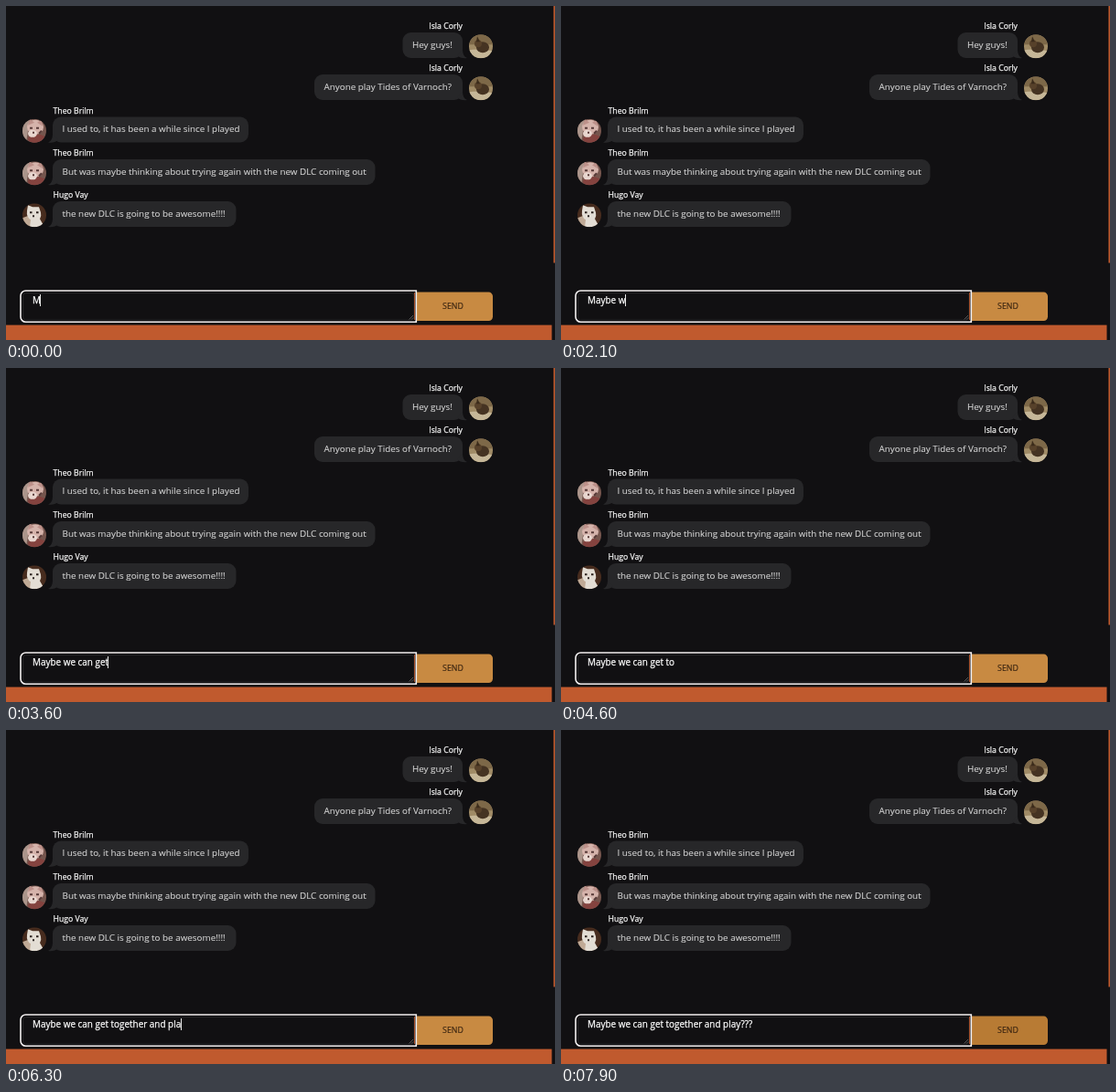
Recreate the animation shown at these times as an HTML page. Size 600x366 px, loop 8 s.

```html
<!DOCTYPE html>
<html lang="en">
<head>
<meta charset="utf-8">
<title>Group chat</title>
<style>
  html, body { margin: 0; width: 600px; height: 366px; overflow: hidden; background: #111012; }
  svg { display: block; }
  text { font-family: "Open Sans", "Noto Sans", sans-serif; white-space: pre; }
  .name { font-size: 8.7px; fill: #f4f4f4; stroke: #f4f4f4; stroke-width: .25; }
  .message { font-size: 9.85px; fill: #d4d4d4; stroke: #d4d4d4; stroke-width: .1; }
  .typed { font-size: 9.93px; fill: #fff; stroke: #fff; stroke-width: .25; }
  .label { font-size: 8.8px; fill: #382310; stroke: #382310; stroke-width: .15; }
  .bubble { fill: #272729; }
</style>
</head>
<body>
<svg width="600" height="366" viewBox="0 0 600 366">
  <defs>
    <clipPath id="round"><circle r="13"/></clipPath>
    <filter id="soft"><feGaussianBlur stdDeviation=".6"/></filter>
    <g id="rabbit" clip-path="url(#round)">
      <rect x="-13" y="-13" width="26" height="26" fill="#a08b66"/>
      <g filter="url(#soft)">
        <path d="M-13 -13H13V-2H-13Z" fill="#7d6848"/>
        <path d="M-13 4Q0 2 13 5V13H-13Z" fill="#c6b798"/>
        <ellipse cx="2" cy="1" rx="7" ry="6" fill="#453322"/>
        <ellipse cx="-3" cy="-3" rx="4" ry="4" fill="#57412a"/>
        <path d="M-5 -5L-4 -11L-1 -5Z" fill="#3b2b1b"/>
      </g>
    </g>
    <g id="pinkCat" clip-path="url(#round)">
      <rect x="-13" y="-13" width="26" height="26" fill="#76564e"/>
      <g filter="url(#soft)">
        <path d="M-13 -13H-5L-9 13H-13Z" fill="#ab958b"/>
        <ellipse cx="1" cy="-4" rx="9" ry="8" fill="#d5b3ab"/>
        <path d="M-7 -6L-5 -13L0 -9ZM3 -9L8 -12L9 -5Z" fill="#bd918a"/>
        <ellipse cx="3" cy="9" rx="10" ry="5" fill="#84433f"/>
        <ellipse cx="-2" cy="3" rx="5" ry="4" fill="#e8d6cf"/>
        <path d="M-5 -3h3M2 -3h3M-2 2h2M5 3l3 -3" stroke="#573a38" stroke-width="2"/>
      </g>
    </g>
    <g id="whiteCat" clip-path="url(#round)">
      <rect x="-13" y="-13" width="26" height="26" fill="#472c1e"/>
      <g filter="url(#soft)">
        <path d="M-13 3L-5 0L-2 13H-13Z" fill="#c0aa96"/>
        <path d="M-8 -5L-7 -11L-2 -9L5 -9L7 -3Q8 1 6 4L11 13H-5L-4 5Q-9 2 -8 -5Z" fill="#e3ddd4"/>
        <path d="M-5 -3h2.5M2 -3h2.5M-2 1h2" stroke="#2b211c" stroke-width="2"/>
      </g>
    </g>
  </defs>
  <rect width="600" height="366" fill="#111012"/>
  <rect x="598.400" width="1.600" height="281.500" fill="#bd582d"/>
  <rect y="349.600" width="596.500" height="16.400" fill="#c05a2e"/>
  <g id="chat"></g>

  <path id="button" d="M447 313.600H527.500a4.500 4.500 0 0 1 4.500 4.500V340.500a4.500 4.500 0 0 1 -4.500 4.500H447Z"/>
  <text class="label" x="488.500" y="332.200" text-anchor="middle">SEND</text>
  <path d="M448.300 312V346.200H21.500a5.500 5.500 0 0 1 -5.500 -5.500V317.500a5.500 5.500 0 0 1 5.500 -5.500Z" fill="#0b0a0c" stroke="#f4f0f0" stroke-width="1.600"/>
  <rect x="18.500" y="314.500" width="427.500" height="29.500" rx="3" fill="#111012" stroke="#252426"/>
  <path d="M446.500 314V344" stroke="#a9502b"/>
  <path d="M440.500 343.500L445 339M443 343.500L445 341.500" stroke="#777" stroke-width=".7"/>
  <text id="typed" class="typed" x="29" y="326"></text>
  <path id="underline" d="M29 328.500H55" stroke="#c7342f"/>
  <rect id="caret" y="316" width="1" height="13" fill="#e8e8e8"/>
</svg>
<script>
const DURATION = 8000;
const BLINK = 525;
const SENTENCE = "Maybe we can get together and play???";
// Arrival time of each character, in ms
const KEY_TIMES = [
  0, 200, 400, 450, 1800, 1900, 2100, 2300,
  2500, 2700, 2800, 3000, 3200,
  3400, 3500, 3600, 3700, 3800, 4000,
  4700, 4800, 4900, 5000, 5100, 5200,
  5400, 5500, 5600, 5700, 5800,
  6000, 6100, 6300, 6350, 7000, 7100, 7200
];
const MESSAGES = [
  { name: "Isla Corly", text: "Hey guys!", avatar: "rabbit", y: 29, width: 65.5, own: true },
  { name: "Isla Corly", text: "Anyone play Tides of Varnoch?", avatar: "rabbit", y: 75, width: 162, own: true },
  { name: "Theo Brilm", text: "I used to, it has been a while since I played", avatar: "pinkCat", y: 121.5, width: 214 },
  { name: "Theo Brilm", text: "But was maybe thinking about trying again with the new DLC coming out", avatar: "pinkCat", y: 168, width: 352.5 },
  { name: "Hugo Vay", text: "the new DLC is going to be awesome!!!!", avatar: "whiteCat", y: 214, width: 200.5 }
];

const byId = id => document.getElementById(id);
const [typed, caret, underline, button] = ["typed", "caret", "underline", "button"].map(byId);

function messageMarkup({ name, text, avatar, y, width, own }) {
  const left = own ? 499 - width : 51;
  const edge = own ? 499 : 51;
  const out = own ? 1 : -1;
  const bottom = y + 28;
  return `
    <text class="name" x="${own ? 499 : 51.5}" y="${y - 4}" text-anchor="${own ? "end" : "start"}">${name}</text>
    <rect class="bubble" x="${left}" y="${y}" width="${width}" height="28" rx="9"/>
    <path class="bubble" d="M${edge} ${bottom - 9}Q${edge} ${bottom - 2} ${edge + out * 5} ${bottom}Q${edge - out * 2} ${bottom + 1} ${edge - out * 6} ${bottom - 3}Z"/>
    <text class="message" x="${left + 10.5}" y="${y + 16.7}">${text}</text>
    <use href="#${avatar}" x="${own ? 519 : 31}" y="${y + 15.3}"/>`;
}

function render(time) {
  const count = KEY_TIMES.filter(key => key <= time).length;
  const sinceKey = time - KEY_TIMES[count - 1];
  typed.textContent = SENTENCE.slice(0, count);
  caret.setAttribute("x", Math.floor(29 + typed.getComputedTextLength()));
  caret.style.display = Math.floor(sinceKey / BLINK) % 2 ? "none" : "";
  underline.style.display = time >= 1500 && time < 1800 ? "" : "none";
  button.setAttribute("fill", time >= 7800 ? "#b87b34" : "#c88a42");
}

byId("chat").innerHTML = MESSAGES.map(messageMarkup).join("");
const start = performance.now();
function tick() {
  render((performance.now() - start) % DURATION);
  requestAnimationFrame(tick);
}
tick();
</script>
</body>
</html>
```
